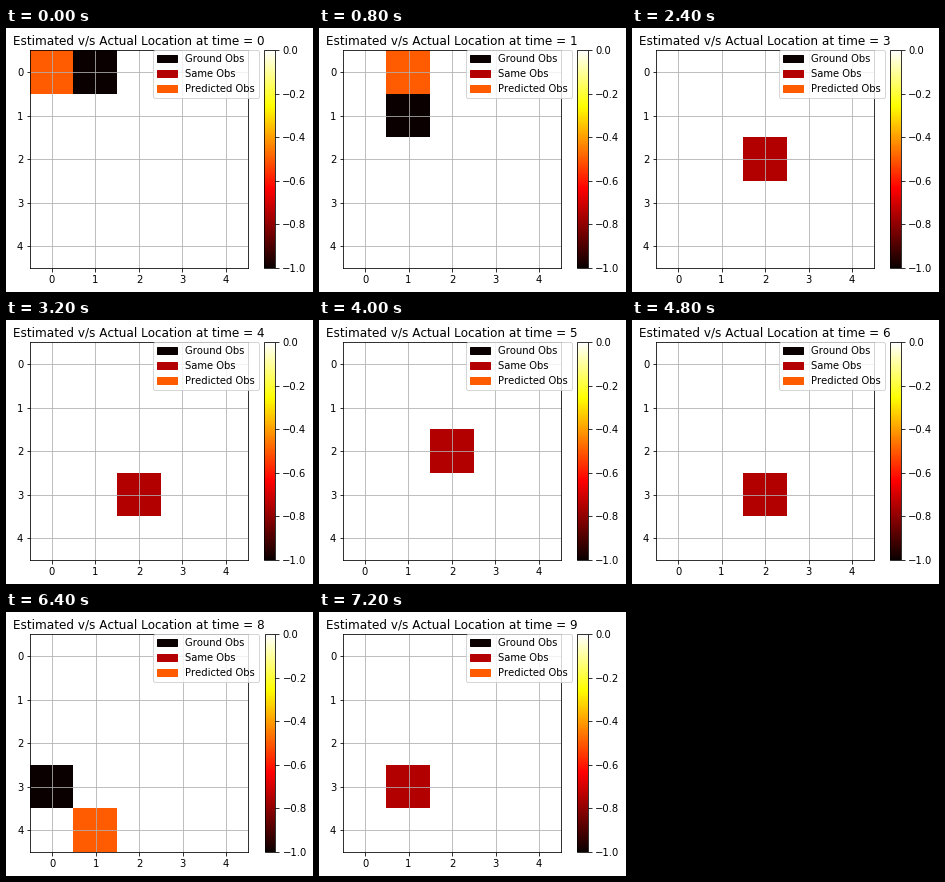
A matplotlib script that plays this animation: 307 by 264 pixels, repeating every 8000 ms.

```python
import numpy as np
import matplotlib.pyplot as plt
from matplotlib.animation import FuncAnimation
from matplotlib.patches import Patch

W, H, DPI = 307, 264, 72
PAD = 7.2          # margin around the tight layout, in pixels
SIDE = 217.44      # side of the square map
BAR_GAP = 16.74
GROUND, SAME, PREDICTED = -1.0, -0.75, -0.5

# (row, column) of the true and of the estimated position at each time
TRUE = [(0, 1), (1, 1), (1, 2), (2, 2), (3, 2),
        (2, 2), (3, 2), (3, 1), (3, 0), (3, 1)]
GUESS = [(0, 0), (0, 1), (1, 2), (2, 2), (3, 2),
         (2, 2), (3, 2), (3, 1), (4, 1), (3, 1)]

plt.rcParams["font.family"] = "DejaVu Sans"
plt.rcParams["text.kerning_factor"] = 6   # kerning in whole pixels
fig = plt.figure(figsize=(W / DPI, H / DPI), dpi=DPI, facecolor="white")
ax = fig.add_axes([0.1, 0.1, 0.7, 0.8])
cax = fig.add_axes([0.85, 0.1, 0.04, 0.8])

image = ax.imshow(np.zeros((5, 5)), cmap="hot", vmin=-1, vmax=0,
                  interpolation="nearest", aspect="auto")
ax.set_xticks(range(5))
ax.set_yticks(range(5))
ax.grid(True)
fig.colorbar(image, cax=cax)
title = ax.set_title("")

entries = [("Ground Obs", GROUND), ("Same Obs", SAME),
           ("Predicted Obs", PREDICTED)]
ax.legend(handles=[Patch(color=image.cmap(image.norm(v)), label=name)
                   for name, v in entries],
          loc="upper right", bbox_to_anchor=(1.05, 1), borderaxespad=0)


def place(x, y):
    ax.set_position([x / W, y / H, SIDE / W, SIDE / H])
    cax.set_position([(x + SIDE + BAR_GAP) / W, y / H,
                      SIDE / 20 / W, SIDE / H])


def grid_values(t):
    cells = np.zeros((5, 5))
    cells[GUESS[t]] = PREDICTED
    cells[TRUE[t]] = SAME if TRUE[t] == GUESS[t] else GROUND
    return cells


def update(t):
    image.set_data(grid_values(t))
    title.set_text(f"Estimated v/s Actual Location at time = {t}")
    # the title's width sets the left margin, the tick labels the bottom one
    place(24, 24)
    renderer = fig.canvas.get_renderer()
    left = title.get_window_extent(renderer).x0
    bottom = ax.xaxis.get_tightbbox(renderer).y0
    place(24 + PAD - left, 24 + PAD - bottom)
    return image, title


anim = FuncAnimation(fig, update, frames=10, interval=800,
                     repeat=True, repeat_delay=0, blit=False)
plt.show()
```
